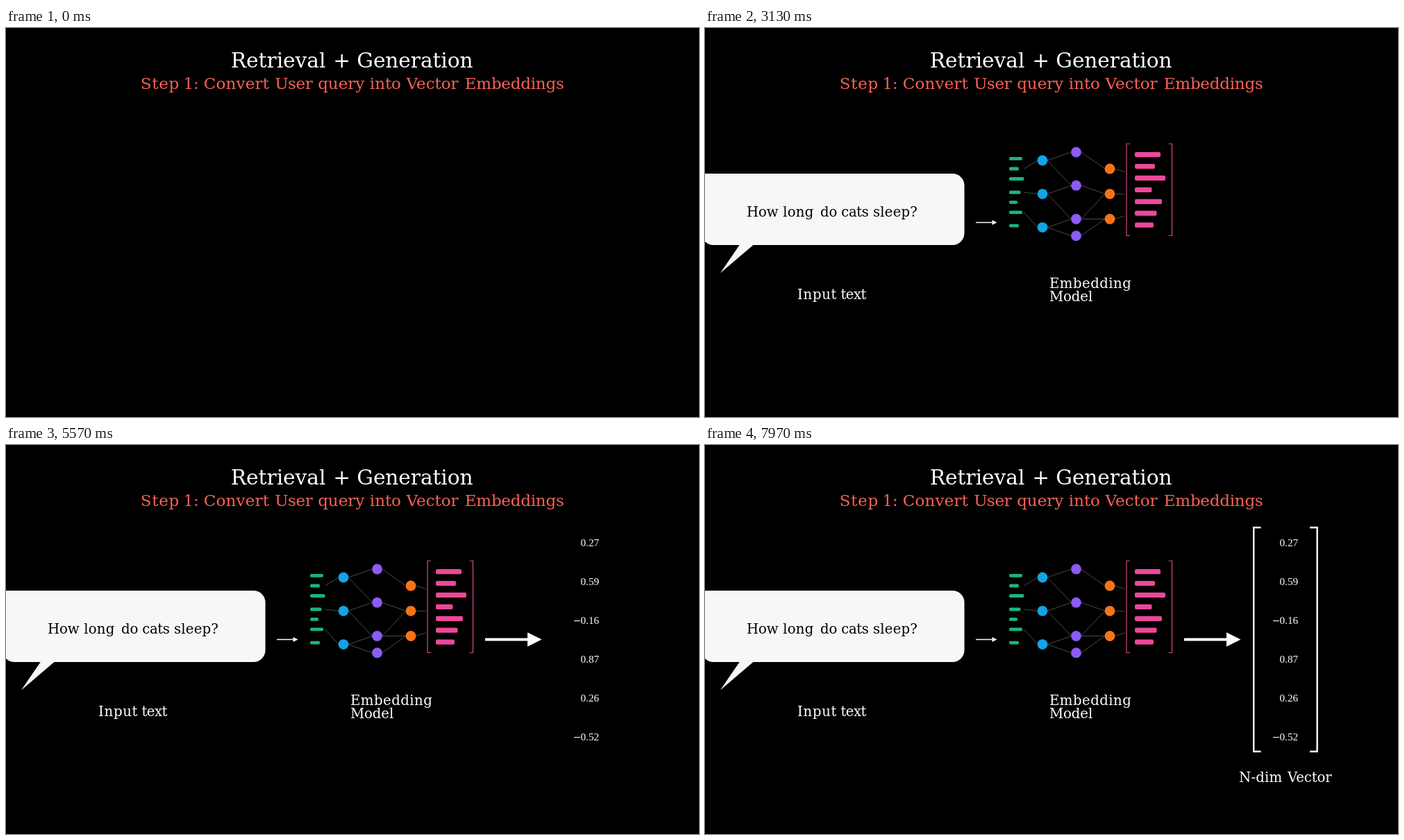
Animation of 998x561 px, one loop 8 s. Source, as an HTML page:

```html
<!DOCTYPE html>
<html lang="en">
<head>
<meta charset="utf-8">
<title>Retrieval + Generation</title>
<style>
  html, body { margin: 0; width: 100%; height: 100%; overflow: hidden; background: #000; }
  svg { display: block; width: 100%; height: 100%; }
  text { font-family: "DejaVu Serif", serif; white-space: pre; }
  .num { font-family: "Liberation Serif", serif; }
</style>
</head>
<body>
<svg id="stage" viewBox="0 0 998 561"></svg>
<script>
const LOOP = 8000;
const stage = document.getElementById('stage');
const clamp = v => Math.min(1, Math.max(0, v));
const sigmoid = v => 1 / (1 + Math.exp(-v));
const smooth = v => {
  const e = sigmoid(-5);
  return clamp((sigmoid(10 * (clamp(v) - 0.5)) - e) / (1 - 2 * e));
};

function add(tag, attrs, parent = stage) {
  const el = document.createElementNS('http://www.w3.org/2000/svg', tag);
  for (const k in attrs) el.setAttribute(k, attrs[k]);
  parent.appendChild(el);
  return el;
}

// One text element, returned as its visible letters.
function letters(str, x, y, size, fill, spacing = 0, cls = '') {
  const text = add('text', { x, y, 'font-size': size, fill, 'letter-spacing': spacing, class: cls });
  const spans = [];
  for (const ch of str) {
    const span = add('tspan', {}, text);
    span.textContent = ch;
    if (ch !== ' ') spans.push(span);
  }
  return spans;
}

// Shows the first n parts of a list.
function reveal(parts, n) {
  parts.forEach((el, i) => el.setAttribute('visibility', i < n ? 'visible' : 'hidden'));
}

// A heading set word by word: [word, x, letter spacing].
function heading(words, y, size, fill) {
  for (const [word, x, spacing = 0] of words) {
    add('text', { x, y, 'font-size': size, fill, 'letter-spacing': spacing }).textContent = word;
  }
}
heading([['Retrieval', 323.8], ['+', 471.2], ['Generation', 505.3, -0.05]], 57.3, 29.6, '#fff');
heading([
  ['Step', 193.7, 0.8], ['1:', 255.5], ['Convert', 284.8, 0.2], ['User', 387.2, -0.4],
  ['query', 449.2], ['into', 523.8], ['Vector', 576.6], ['Embeddings', 660.8, -0.2]
], 88, 22.95, '#fc6255');

// Speech bubble with its caption
const SIZE = 19.7;
const bubble = add('g', { fill: '#f5f8f5' });
add('path', { d: 'M-5 210H356.5a17 17 0 0 1 17 17V296a17 17 0 0 1 -17 17H12a17 17 0 0 1 -17 -17Z' }, bubble);
add('path', { d: 'M50 312.5L22 353.5L70 312.5Z' }, bubble);
const query = [
  bubble,
  ...letters('How', 60, 272, SIZE, '#000', -0.1),
  ...letters('long', 112.3, 272, SIZE, '#000', 0.2),
  ...letters('do', 166, 272, SIZE, '#000'),
  ...letters('cats', 196.3, 272, SIZE, '#000', -0.4),
  ...letters('sleep?', 242, 272, SIZE, '#000', 0.2),
  ...letters('Input', 133, 391, SIZE, '#fff', 0.7),
  ...letters('text', 195.5, 391, SIZE, '#fff', -0.6)
];

// Embedding network with its caption
const model = [];
const bar = (x, y, w, h, fill) => model.push(
  add('rect', { x, y: y - h / 2, width: w, height: h, rx: 2, fill }));
const dots = (x, ys, fill) => ys.forEach(y => model.push(
  add('circle', { cx: x, cy: y, r: 7.4, fill })));
const wire = (x1, y1, x2, y2) => model.push(
  add('line', { x1, y1, x2, y2, stroke: '#5c5c60', 'stroke-width': 0.8 }));
const frame = d => model.push(
  add('path', { d, fill: 'none', stroke: '#d9468f', 'stroke-width': 1.2 }));

[[188.4, 19], [203, 14], [217.5, 21.5], [237, 16.5], [251.3, 12], [265.8, 19], [285.2, 14]]
  .forEach(([y, w]) => bar(438, y, w, 4.8, '#1cb384'));
const blue = [191, 239.3, 287.6];
const violet = [179, 227.2, 275.5, 299.7];
const orange = [203, 239.3, 275.5];
dots(486, blue, '#14a3e6');
dots(534.5, violet, '#8b5cf6');
dots(583, orange, '#f97316');
[37, 29, 44, 24.5, 39, 31.5, 27]
  .forEach((w, i) => bar(619, 182.6 + i * 16.92, w, 7.2, '#ec4899'));
frame('M612 167H607V299.5H612');
frame('M667.5 167H672.5V299.5H667.5');
[203, 237, 266].forEach((y, i) => wire(459.5, y, 479, blue[i]));
[[0, 0], [0, 1], [1, 1], [1, 2], [2, 2], [2, 3]]
  .forEach(([a, b]) => wire(493, blue[a], 527.5, violet[b]));
[[0, 0], [1, 1], [2, 1], [2, 2], [3, 2]]
  .forEach(([a, b]) => wire(541.5, violet[a], 576, orange[b]));
[207.5, 239.8, 271].forEach((y, i) => wire(590, orange[i], 604.5, y));
model.push(
  ...letters('Embedding', 496, 375, SIZE, '#fff', 0.45),
  ...letters('Model', 496, 394, SIZE, '#fff', -0.1));

// An arrow whose shaft grows first, then its tip is traced.
function arrow(x, neck, end, half, width) {
  const y = 280.5;
  const shaft = add('line', { x1: x, y1: y, x2: x, y2: y, stroke: '#fff', 'stroke-width': width });
  const tip = add('polygon', { fill: '#fff' });
  const corners = [[end, y], [neck, y - half], [neck, y + half], [end, y]];
  return a => {
    shaft.setAttribute('x2', x + (neck - x) * smooth(2 * a));
    const p = 3 * smooth(2 * a - 1);
    const n = Math.min(2, Math.floor(p));
    const [from, to] = [corners[n], corners[n + 1]];
    const last = from.map((v, i) => v + (to[i] - v) * (p - n));
    tip.setAttribute('points', [...corners.slice(0, n + 1), last].join(' '));
  };
}
const thinArrow = arrow(390, 413.5, 420.5, 3.6, 1.5);
const bigArrow = arrow(690, 751, 771.5, 10.2, 4.2);

// Result vector
const digits = [];
['0.27', '0.59', '−0.16', '0.87', '0.26', '−0.52'].forEach((str, i) => {
  const y = 145.8 + i * 56.05;
  if (str[0] === '−') digits.push(...letters('−', 816.8, y, 14, '#fff'));
  digits.push(...letters(str.replace('−', ''), 827.5, y, 15.2, '#fff', 0, 'num'));
});
const PIECES = 10;
const brackets = ['M800.5 119H790.2V442H800.5', 'M871 119H881.6V442H871'].map(d =>
  add('path', { d, fill: 'none', stroke: '#fff', 'stroke-width': 2.4, pathLength: PIECES }));

function drawVector(a) {
  const n = Math.floor(a * (digits.length + 2 * PIECES));
  reveal(digits, n);
  brackets.forEach((el, i) => {
    const done = Math.min(PIECES, Math.max(0, n - digits.length - i * PIECES));
    el.setAttribute('visibility', done ? 'visible' : 'hidden');
    el.setAttribute('stroke-dasharray', done < PIECES ? `${done} ${2 * PIECES}` : 'none');
  });
}

const caption = [
  ...letters('N-dim', 769, 486, SIZE, '#fff', 0.2),
  ...letters('Vector', 839, 486, SIZE, '#fff', -0.15)
];

// Letters are outlined, then filled, each starting a little later.
function write(spans, a) {
  const lag = Math.min(0.2, 4 / (spans.length + 1));
  const span = 1 + lag * (spans.length - 1);
  spans.forEach((el, i) => {
    const p = clamp(a * span - i * lag);
    const line = clamp(2 * p), fill = clamp(2 * p - 1);
    el.setAttribute('visibility', p > 0 ? 'visible' : 'hidden');
    el.setAttribute('fill-opacity', fill);
    el.setAttribute('stroke', p < 1 ? '#fff' : 'none');
    el.setAttribute('stroke-width', 1.2 * (1 - fill));
    el.setAttribute('stroke-dasharray', line < 1 ? `${60 * line} 200` : 'none');
  });
}

function draw(t) {
  const part = start => clamp((t - start) / 1000);
  reveal(query, Math.floor(part(-10) * query.length));
  thinArrow(part(1990));
  reveal(model, Math.floor(part(1985) * model.length));
  bigArrow(part(3990));
  drawVector(part(4985));
  write(caption, part(5985));
}

function tick() {
  draw(performance.now() % LOOP);
  requestAnimationFrame(tick);
}
tick();
</script>
</body>
</html>
```
